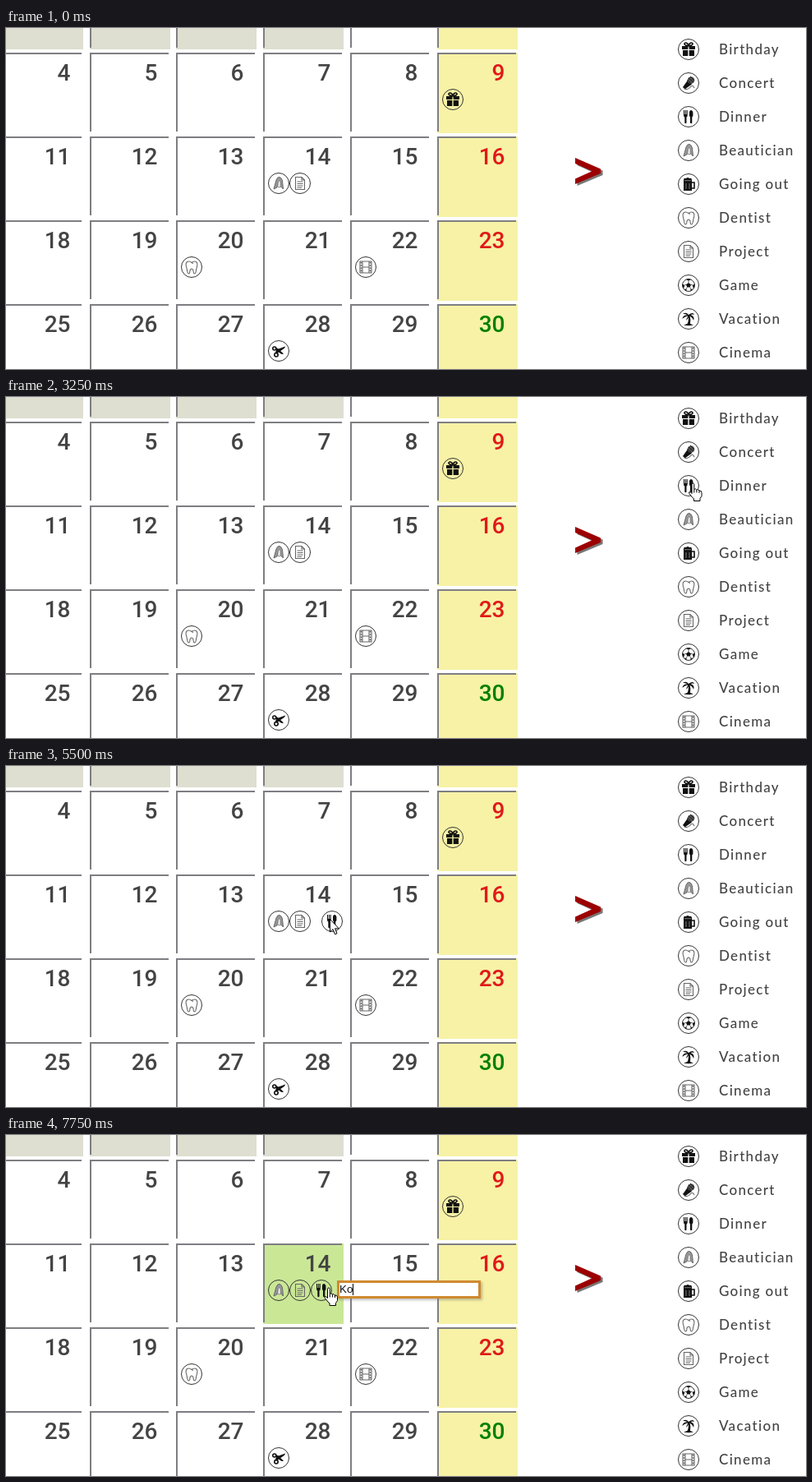
Animation, 974 px wide and 415 px high, one loop 8 s. Source, as an HTML page:

```html
<!DOCTYPE html>
<html lang="en">
<head>
<meta charset="utf-8">
<title>Calendar planner</title>
<style>
  html, body { margin: 0; width: 100%; height: 100%; overflow: hidden; background: #fff; }
  svg { display: block; }
  .day { font: 500 28px Roboto, sans-serif; text-anchor: end; }
  .label { font: 500 17px Lato, sans-serif; letter-spacing: 1.3px; fill: #444; }
  .field { font: 13.33px "Liberation Sans", Arial, sans-serif; }
  .ring { fill: none; stroke: #333; }
  .ink { fill: #111; }
  .thin { fill: none; stroke: #666; stroke-width: 1.1; }
  .pointer { fill: #fff; stroke: #000; stroke-linejoin: round; }
</style>
</head>
<body>
<svg id="stage" width="974" height="415" viewBox="0 0 974 415">
  <defs>
    <g id="gift" class="ink">
      <path d="M-8-4H-.7V0H-8ZM.7-4H8V0H.7ZM-7 1H-.7V8H-7ZM.7 1H7V8H.7Z"/>
      <path d="M0-4.5C-6-4-6-8-3.5-8Q-1-8 0-4.5Q1-8 3.5-8C6-8 6-4 0-4.5" fill="none" stroke="#111" stroke-width="1.6"/>
    </g>
    <g id="mic">
      <path class="ink" d="M-1-3.5L4 1.5-4.5 7.5-7 5Z"/>
      <circle cx="3" cy="-3.5" r="4.3" fill="#555"/>
      <path d="M-1.5-4L3.5 1M0-6L6-1M2-8L7-3" stroke="#111" fill="none"/>
      <path d="M-5 7Q-1 9 2 5T7 6" class="thin"/>
    </g>
    <g id="dinner" class="ink">
      <path d="M-6-8H-5V-3H-4.2V-8H-3.2V-3H-2.4V-8H-1.3V-2Q-1.3 0-2.5 .5V7.5Q-3.6 8.8-4.7 7.5V.5Q-6 0-6-2Z"/>
      <path d="M1-6Q1.5-8 3.2-8T5.4-5.5V-1L4.3 .5V7.5Q3.2 8.8 2 7.5V.5L1-1Z"/>
    </g>
    <g id="nail">
      <path d="M-6 7L-3-4Q-1.5-8 1-7.5T4.5-3L5.5 7L2.5 4V-1Q1-4-1-1L-2 5Z" fill="#999" stroke="#666"/>
      <path d="M-1-1Q1-6 2.5-1V4Q.5 6-1.5 4Z" fill="#ddd" stroke="#777" stroke-width=".8"/>
    </g>
    <g id="mug" class="ink">
      <path d="M-6-5Q-6-8-3-7Q-1-9 1-7Q4-8 4-5V8H-6Z"/>
      <path d="M4-2H7V5H4" fill="none" stroke="#111" stroke-width="1.6"/>
      <path d="M-5-4.3H3M-3-1V6M1-1V6" stroke="#999" stroke-width=".8"/>
    </g>
    <path id="tooth" class="thin" d="M0-5.5Q3-8 5.5-6.5C9-4 5.5 1 5.5 4Q5 8 3.5 8Q2.2 8 2 4Q0 0-2 4Q-2.2 8-3.5 8Q-5 8-5.5 4C-5.5 1-9-4-5.5-6.5Q-3-8 0-5.5L2-4.5"/>
    <path id="page" class="thin" d="M-5.5-7.5H2L5.5-4V7.5H-5.5ZM2-7.5V-4H5.5M-3.5-2H3.5M-3.5 .5H3.5M-3.5 3H3.5M-3.5 5.3H2"/>
    <g id="ball">
      <circle r="7.5" class="ring"/>
      <path class="ink" d="M0-3L3-.8 1.8 2.6H-1.8L-3-.8ZM-3-7L0-5.5 3-7Q0-8.5-3-7ZM7.5-1.5L5 0 5.5 3.5 7 2.5ZM-7.5-1.5L-5 0-5.5 3.5-7 2.5ZM2.5 5L5.5 4.5 2.5 7.4ZM-2.5 5L-5.5 4.5-2.5 7.4Z"/>
      <path d="M0-3V-6M3-.8L5 0M1.8 2.6L3 5M-1.8 2.6L-3 5M-3-.8L-5 0" stroke="#333" stroke-width=".8"/>
    </g>
    <g id="palm" class="ink">
      <path d="M-1-4L1.5-4Q3 1 2 6L6 7.5Q0 9-6 7.5L-1.5 6Q1 1-1-4Z"/>
      <path d="M0-5Q-3-9-7-6Q-3-6.5-1.5-4.5Q-7-5-7.5 0Q-4-3.5 0-3.5Q-3-1-2.5 2Q0-2 1-3.5Q5-2 6 2Q8-3 2.5-5Q6-6 7-4.5Q6-9 0-5Z"/>
    </g>
    <g id="film">
      <path class="thin" d="M-7-7H7V7H-7ZM-4-7V7M4-7V7M-4 0H4"/>
      <path d="M-5.5-6V7M5.5-6V7" stroke="#555" stroke-width="1.6" stroke-dasharray="1.6 1.6"/>
    </g>
    <g id="scissors">
      <path class="ink" d="M-3-1.5L8-5.5Q8-4 6-2.5L0 1.5-2 3.5-4 2ZM-4-4L-1-3L6 3.5Q4 4.5 2 3L-4-1.5Z"/>
      <g fill="none" stroke="#111" stroke-width="1.6"><circle cx="-5.2" cy="-3" r="2"/><circle cx="-3" cy="4.8" r="2.2"/></g>
    </g>
    <path id="arrow" class="pointer" d="M.5 .5V16L4 12.6 6.5 18.8 9 17.8 6.6 11.8H11.3Z"/>
    <g id="hand">
      <path class="pointer" d="M4 13V2Q4 .5 5.3 .5T6.8 2V8Q8.5 6.3 9.8 8.5Q11.8 7.2 13 9.5Q16 9 16 12V16L14 19V22H6.5V19.5L4.5 17.5 .8 13Q0 10.5 2 11Z"/>
      <path d="M6.8 8V12M9.9 8.5V12M13 9.5V12.5" stroke="#000"/>
    </g>
  </defs>
</svg>
<script>
const stage = document.getElementById('stage');
const INK = '#444', LINE = '#7e7e82', YELLOW = '#f7f2a6', GREY = '#deded1', GREEN = '#cae796';

const rect = (x, y, w, h, fill, extra = '') =>
  `<rect x="${x}" y="${y}" width="${w}" height="${h}" fill="${fill}" ${extra}/>`;
const text = (cls, x, y, str, extra = '') =>
  `<text class="${cls}" x="${x}" y="${y}" ${extra}>${str}</text>`;
const icon = (name, x, y) =>
  `<g transform="translate(${x} ${y})"><circle r="12.5" class="ring"/><use href="#${name}"/></g>`;
const colX = c => Math.floor(105.8 * c - 3.8);
const rowY = r => 102 * r - 72;

function cell(r, c) {
  const x = colX(c), y = rowY(r), day = 7 * r - 3 + c;
  const fill = c == 5 ? YELLOW : r == 0 && c < 4 ? GREY : '#fff';
  const color = day == 30 ? '#008000' : c == 5 ? '#e01919' : INK;
  return rect(x, y, 98, 98, fill) +
    rect(x, y, 98, 98, GREEN, `id="hover${r}${c}" opacity="0"`) +
    rect(x, y, 96, 2, LINE) + rect(x, y, 2, 96, LINE) +
    (r ? text('day', x + 82.5, y + 34, day, `fill="${color}"`) : '');
}

let art = '';
for (let r = 0; r < 5; r++) for (let c = 0; c < 6; c++) art += cell(r, c);

const chevron = 'M693 158L724 171.5V177L693 190V183.5L713.5 174.3 693 165Z';
art += `<path d="${chevron}" fill="#777" transform="translate(2.5 2)"/><path d="${chevron}" fill="#9c0000"/>`;

const legend = {
  gift: 'Birthday', mic: 'Concert', dinner: 'Dinner', nail: 'Beautician', mug: 'Going out',
  tooth: 'Dentist', page: 'Project', ball: 'Game', palm: 'Vacation', film: 'Cinema'
};
Object.entries(legend).forEach(([name, label], i) => {
  const y = 26 + 41 * i;
  art += icon(name, 831, y) + text('label', 868, y + 5.5, label);
});

art += icon('gift', 544, 87) + icon('nail', 332, 189) + icon('page', 358, 189) +
  icon('tooth', 226, 291) + icon('film', 438, 291) + icon('scissors', 332, 393) +
  `<g id="ghost">${icon('dinner', 0, 0)}</g>
  <g id="form">
    ${rect(405, 179, 175, 22, '#777', 'opacity=".45" style="filter:blur(1.5px)"')}
    ${rect(404.5, 178.5, 172, 19, '#fff', 'stroke="#d08a30" stroke-width="3"')}
    ${text('field', 406, 192, '', 'id="entry"')}
    ${rect(0, 181, 1, 14, '#000', 'id="caret"')}
  </g>
  <use id="pointer"/>`;
stage.insertAdjacentHTML('beforeend', art);

const el = id => document.getElementById(id);
const move = (node, x, y) => node.setAttribute('transform', `translate(${x} ${y})`);
const show = (node, on) => node.setAttribute('visibility', on ? 'visible' : 'hidden');

// start time, pointer shape, pointer x, y, dragged icon x, y
const steps = [
  [0],
  [1250, 'arrow', 663, 388],
  [1500, 'arrow', 764, 219],
  [1750, 'arrow', 865, 69],
  [2500, 'arrow', 852, 73],
  [2750, 'hand', 826, 103],
  [3000, 'hand', 830, 104],
  [3250, 'hand', 831, 104.5],
  [3750, 'arrow', 833, 106, 832, 110],
  [4000, 'arrow', 760, 115, 759, 119],
  [4250, 'arrow', 732, 115, 731, 119],
  [4500, 'arrow', 702, 121, 701, 125],
  [4750, 'arrow', 547, 168, 547, 172],
  [5000, 'arrow', 520, 173, 521, 176],
  [5250, 'arrow', 422, 187, 424, 190],
  [5500, 'arrow', 394, 186, 397, 189],
  [5750, 'hand', 387.5, 185.5, 384, 189]
];

function draw() {
  const t = performance.now() % 8000;
  const [, shape, x, y, iconX, iconY] = steps.findLast(s => s[0] <= t);
  const dropped = t >= 5750, typed = 'Ko'.slice(0, t < 7500 ? 0 : t < 7750 ? 1 : 2);

  show(el('pointer'), shape);
  if (shape) {
    el('pointer').setAttribute('href', '#' + shape);
    move(el('pointer'), x, y);
  }
  show(el('ghost'), iconX);
  if (iconX) move(el('ghost'), iconX, iconY);

  el('hover45').setAttribute('opacity', t >= 1250 && t < 1500 ? .5 : 0);
  el('hover23').setAttribute('opacity', dropped ? 1 : 0);

  show(el('form'), dropped);
  const entry = el('entry');
  entry.textContent = typed || 'Add description';
  entry.setAttribute('fill', typed ? '#111' : '#757575');
  const caretOn = dropped && (typed || Math.floor((t - 5750) / 500) % 2);
  show(el('caret'), caretOn);
  el('caret').setAttribute('x', typed ? Math.round(406 + entry.getComputedTextLength()) : 406);
  requestAnimationFrame(draw);
}
draw();
</script>
</body>
</html>
```
